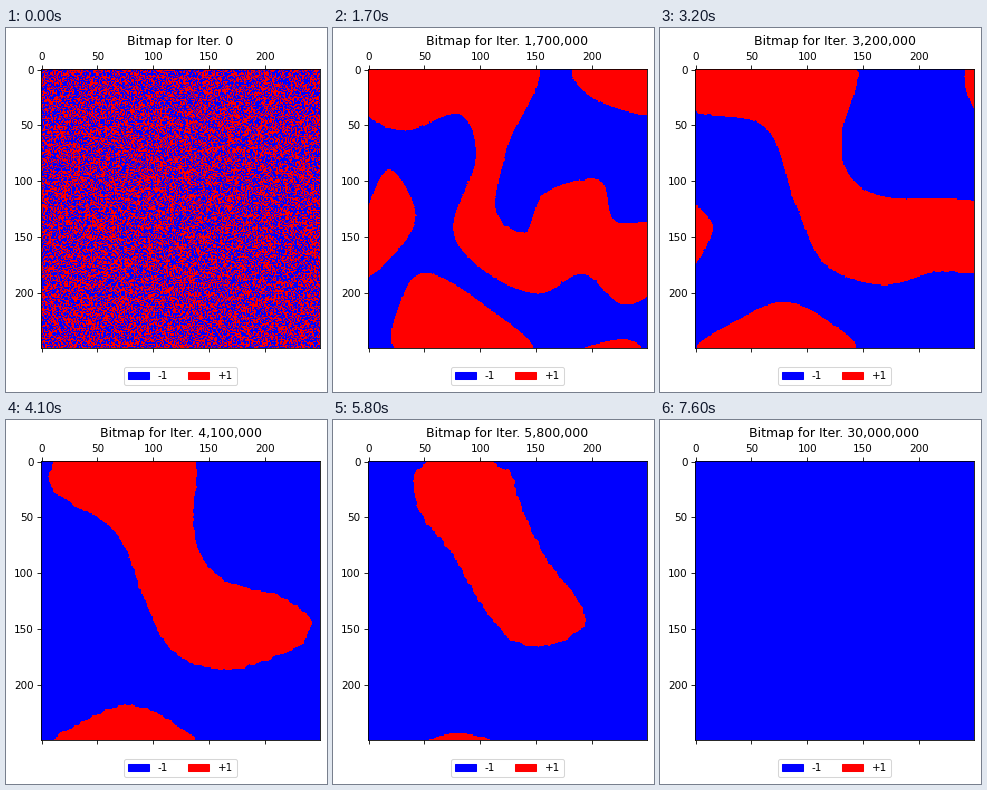
Write a matplotlib script that moves like this. It is 321 px wide and 364 px high and loops after 7700 ms.

```python
import numpy as np
import matplotlib.pyplot as plt
from matplotlib.animation import FuncAnimation
from matplotlib.colors import ListedColormap
from matplotlib.patches import Patch
from matplotlib.path import Path

W, H, DPI = 321, 364, 75
LEFT, TOP, SIDE, N = 35, 41, 279, 250
FRAMES = 77

rng = np.random.default_rng(7)
spins = rng.choice([-1.0, 1.0], (N, N))

# Cell centres in stage pixels
centre = (np.arange(N) + 0.5) * SIDE / N
gx, gy = np.meshgrid(LEFT + centre, TOP + centre)
cells = np.column_stack([gx.ravel(), gy.ravel()])

freq = np.fft.fftfreq(N)
freq2 = freq[:, None] ** 2 + freq[None, :] ** 2


def blur(a, sigma):
    """Periodic Gaussian blur."""
    kernel = np.exp(-2 * (np.pi * sigma) ** 2 * freq2)
    return np.fft.ifft2(np.fft.fft2(a) * kernel).real


def unit(a):
    return a / a.std()


def dist(mask, reach=60):
    """Distance on the torus to the nearest set cell."""
    d = np.where(mask, 0.0, 1e4)
    for axis in (0, 1):
        best = d.copy()
        for s in range(1, reach):
            for step in (s, -s):
                np.minimum(best, np.roll(d, step, axis) + s * s, out=best)
        d = best
    return np.minimum(np.sqrt(d), reach)


def smooth(pts):
    """Closed Catmull-Rom curve."""
    p1 = np.array(pts, float)
    p0, p2, p3 = (np.roll(p1, s, 0) for s in (1, -1, -2))
    t = np.linspace(0, 1, 8, endpoint=False)[:, None, None]
    curve = p1 + t / 2 * (p2 - p0 + t * (2 * p0 - 5 * p1 + 4 * p2 - p3
                                         + t * (3 * (p1 - p2) + p3 - p0)))
    return curve.transpose(1, 0, 2).reshape(-1, 2)


def region(*shapes):
    """Signed distance to the union of smooth closed shapes."""
    mask = np.zeros(N * N, bool)
    for pts in shapes:
        mask |= Path(smooth(pts)).contains_points(cells)
    mask = mask.reshape(N, N)
    return dist(~mask) - dist(mask)


bands = region(
    [(30, 82), (72, 103), (126, 86), (143, 130), (120, 200), (150, 242),
     (205, 266), (250, 246), (290, 277), (325, 255), (325, 198), (282, 193),
     (266, 152), (212, 165), (192, 204), (163, 182), (174, 120), (200, 30),
     (30, 35)],
    [(243, 36), (258, 69), (325, 86), (325, 30)],
    [(30, 197), (56, 141), (82, 195), (30, 252)],
    [(68, 326), (70, 268), (95, 245), (150, 276), (199, 326)],
    [(247, 322), (290, 311), (307, 322)])

arm = region(
    [(30, 81), (105, 99), (135, 175), (165, 236), (222, 257), (275, 244),
     (325, 240), (325, 177), (225, 169), (188, 145), (182, 105), (188, 30),
     (30, 30)],
    [(307, 36), (306, 62), (320, 85), (325, 36)],
    [(30, 179), (53, 200), (30, 240)],
    [(40, 324), (85, 288), (125, 274), (165, 291), (190, 324)])

club = region(
    [(66, 30), (73, 85), (118, 130), (152, 205), (180, 234), (225, 241),
     (272, 222), (270, 182), (218, 149), (190, 95), (172, 30)],
    [(66, 322), (122, 297), (172, 322)])

bean = region(
    [(102, 58), (143, 49), (175, 63), (200, 108), (233, 180), (205, 212),
     (170, 198), (119, 136), (94, 95)])

drop = region([(146, 96), (184, 112), (176, 152), (136, 136)])

stages = [(17, bands), (32, arm), (51, club), (65, bean), (75, drop)]
rough = unit(blur(spins, 1.5))
trend = np.clip(bands, -12, 12)


def grow(k):
    """Random domains that widen with k."""
    return unit(blur(spins, 0.4 + 0.46 * k)) + 0.004 * k * trend


def state(k):
    if k == 0:
        return spins
    if k == FRAMES - 1:
        return -np.ones((N, N))
    if k <= 7:
        f = grow(k)
    elif k < 17:
        u = (k - 7) / 10
        f = 8 * (1 - u) * grow(k) + u * u * trend + 0.5 * u * rough
    else:
        for (t0, a), (t1, b) in zip(stages, stages[1:]):
            if k <= t1:
                break
        u = (k - t0) / (t1 - t0)
        f = (1 - u) * a + u * b + 0.5 * rough
    return np.where(f > 0, 1.0, -1.0)


def title(k):
    count = 30_000_000 if k == FRAMES - 1 else k * 100_000
    return f"Bitmap for Iter. {count:,}"


fig = plt.figure(figsize=(W / DPI, H / DPI), dpi=DPI, facecolor="white")
ax = fig.add_axes([LEFT / W, 1 - (TOP + SIDE) / H, SIDE / W, SIDE / H])
image = ax.matshow(spins, cmap=ListedColormap(["blue", "red"]), vmin=-1, vmax=1)
ax.set_title(title(0), fontsize=12)
ax.legend(handles=[Patch(color="blue", label="-1"), Patch(color="red", label="+1")],
          loc="upper center", bbox_to_anchor=(0.5, -0.05), ncol=2, fontsize=10)


def update(k):
    image.set_data(state(k))
    ax.set_title(title(k), fontsize=12)
    return [image]


anim = FuncAnimation(fig, update, frames=FRAMES, interval=100, repeat=True,
                     repeat_delay=0, blit=False)
plt.show()
```
